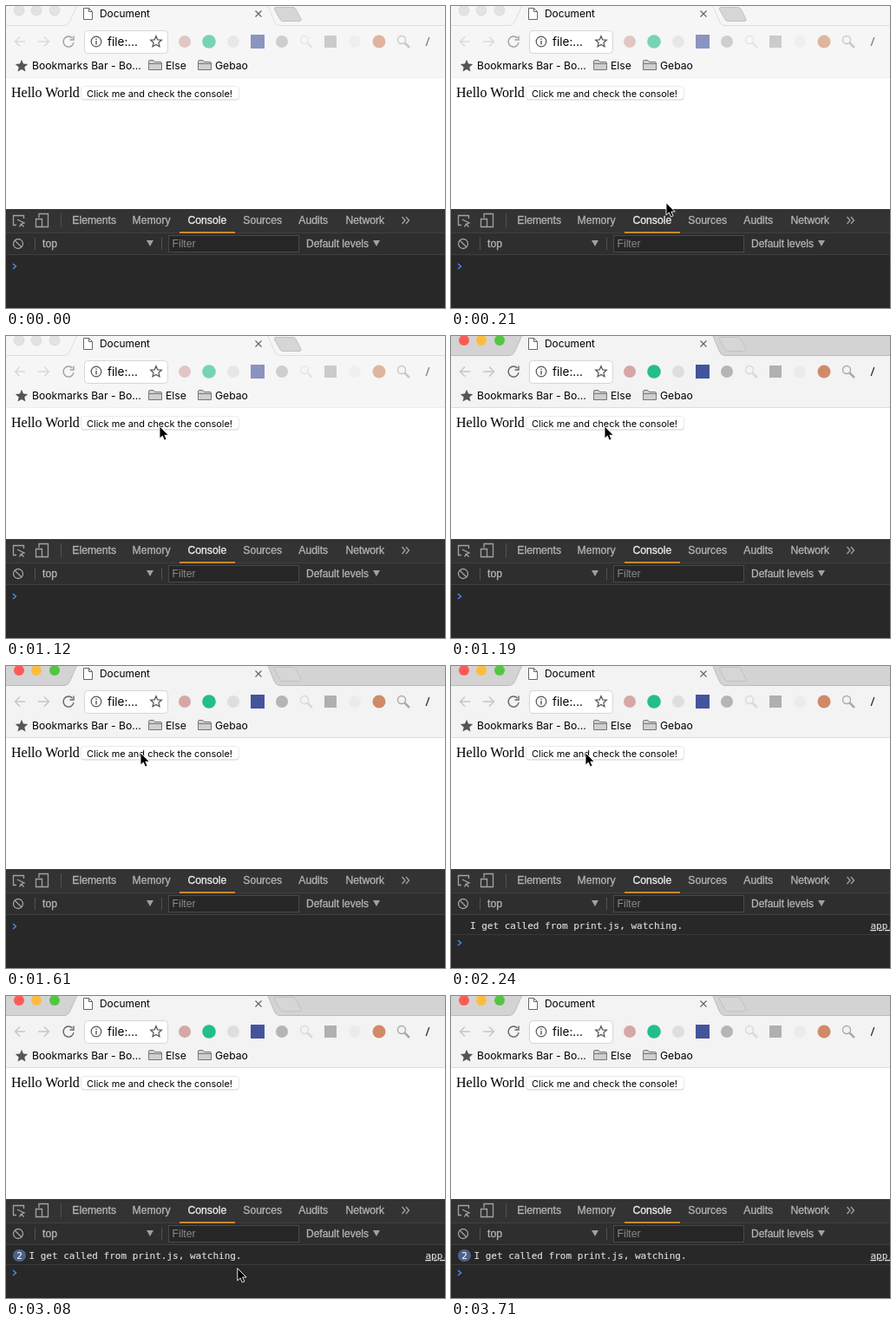
These frames come from a looping animation (506 by 348 pixels, 3.78 s). An HTML page:

```html
<!DOCTYPE html>
<html lang="en">
<head>
<meta charset="utf-8">
<title>Console demo</title>
<style>
html, body { margin: 0; width: 100%; height: 100%; overflow: hidden; background: #fff; }
svg { display: block; width: 506px; height: 348px; --frame: #f6f6f6; --bar: #f6f6f6; --edge: #dedede; --dim: .6; }
svg.active { --frame: #d3d3d3; --bar: #f3f3f3; --edge: #bdbdbd; --dim: 1; }
text { white-space: pre; }
.ui { font: 12.2px Inter, Roboto, sans-serif; fill: #000; }
.dev { font: 12.2px "Liberation Sans", Arial, sans-serif; fill: #b2b5b8; stroke: #b2b5b8; stroke-width: .3; }
.mono { font: 11px "DejaVu Sans Mono", monospace; fill: #dcdcdc; stroke: #dcdcdc; stroke-width: .15; }
.line { fill: none; stroke-width: 1.4; }
.frame { fill: var(--frame); }
.bar { fill: var(--bar); }
.edge { fill: none; stroke: var(--edge); }
.dim { opacity: var(--dim); }
.light { fill: #e2e2e2; stroke: #d4d4d4; stroke-width: .6; }
.active .light { fill: var(--c); stroke: none; }
</style>
</head>
<body>
<svg id="stage" viewBox="0 0 506 348">
  <defs>
    <path id="star" d="M0-7.2 2-2.4 7.2-2 3.3 1.5 4.5 6.6 0 3.9-4.5 6.6-3.3 1.5-7.2-2-2-2.4Z"/>
    <path id="folder" d="M.5 11.5V2Q.5.5 2 .5H6L7.5 2.5H14Q15.5 2.5 15.5 4V11.5ZM.5 4.5H15.5" fill="#d0d0d0" stroke="#777"/>
    <g id="lens" class="line" stroke="#aaa"><circle cx="-2" cy="-2" r="4.5"/><path d="M1.5 1.5 7 7" stroke-width="2.5"/></g>
  </defs>

  <!-- Browser window -->
  <rect class="frame" width="506" height="24"/>
  <g id="lights"></g>
  <path class="bar" d="M0 22.5H68Q72 22 74 17L81.5 0H302L309 17Q311 22 315 22.5H506V83H0Z"/>
  <path class="edge" d="M0 22.5H68Q72 22 74 17L81.5 0M302 0 309 17Q311 22 315 22.5H506"/>
  <path d="M311 1.5H331Q333 1.5 334 3.5L340 15Q341 17.5 338 17.5H319Q317 17.5 316 15.5L309.5 4Q308.5 1.5 311 1.5Z" fill="#d6d6d6" stroke="#c2c2c2"/>
  <path d="M89.5 2.5H95.5L99.5 6.5V15.5H89.5ZM95.5 2.5V6.5H99.5" fill="#fff" stroke="#666"/>
  <text class="ui" x="108" y="13" style="font-size:11.9px">Document</text>
  <path d="M287.5 5.5 294.5 12.5M294.5 5.5 287.5 12.5" stroke="#666" stroke-width="1.2"/>

  <g class="line dim" stroke="#c6c6c6">
    <path d="M22 41H11M16 35.5 10.5 41 16 46.5M37 41H49M44 35.5 49.5 41 44 46.5"/>
    <path d="M76.5 37A6 6 0 1 0 78 42M78 34.5V39H73.5" stroke="#666"/>
  </g>
  <rect x="90.5" y="28.5" width="96" height="26" rx="4" fill="#fff" stroke="#d6d6d6"/>
  <g class="line" stroke="#555">
    <circle cx="104" cy="41" r="5.8" style="stroke-width:1.2"/>
    <path d="M104 40V44.5M104 37.5V39"/>
    <use href="#star" transform="translate(173 41) scale(.88)"/>
  </g>
  <text class="ui" x="117" y="46" style="font-size:13.5px">file:…</text>
  <g class="dim">
    <circle cx="206" cy="41" r="7" fill="#d6a7a7"/>
    <circle cx="234" cy="41" r="7.8" fill="#24bd8d"/>
    <circle cx="262" cy="41" r="7" fill="#dedede"/>
    <rect x="282" y="33" width="16" height="16" fill="#44549c"/>
    <circle cx="318" cy="41" r="7" fill="#b5b5b5"/>
    <use href="#lens" x="346" y="41" opacity=".35"/>
    <rect x="367" y="34" width="14" height="14" fill="#b0b0b0"/>
    <circle cx="402" cy="41" r="7" fill="#ebebeb"/>
    <circle cx="430" cy="41" r="7.5" fill="#d18a68"/>
    <use href="#lens" x="458" y="41"/>
    <path d="M484.2 46 487.8 36" stroke="#333" stroke-width="1.3"/>
  </g>

  <use href="#star" x="18" y="69" fill="#555"/>
  <text class="ui" x="30" y="73">Bookmarks Bar - Bo…</text>
  <use href="#folder" x="164" y="62"/>
  <text class="ui" x="184" y="73">Else</text>
  <use href="#folder" x="221" y="62"/>
  <text class="ui" x="241" y="73">Gebao</text>

  <!-- Page -->
  <rect y="82" width="506" height="152" fill="#fff"/>
  <path class="edge" d="M0 82.5H506" opacity=".5"/>
  <text x="6" y="105" font-family="'Liberation Serif', Times, serif" font-size="16">Hello World</text>
  <rect x="86.5" y="93" width="182" height="15.5" rx="3.5" fill="#d0d0d0"/>
  <rect x="86.5" y="92.5" width="182" height="15" rx="3.5" fill="#fff" stroke="#e6e6e6" stroke-width=".8"/>
  <text class="ui" x="93" y="105" style="font-size:10.96px">Click me and check the console!</text>

  <!-- Developer tools -->
  <rect y="234" width="506" height="114" fill="#282828"/>
  <rect y="234" width="506" height="28" fill="#333"/>
  <rect y="262" width="506" height="24" fill="#2e2e2e"/>
  <path d="M0 261.5H506M0 286.5H506" stroke="#404040"/>
  <path d="M63.5 239V255M33.5 267V281M179.5 267V281" stroke="#525252"/>
  <rect x="200" y="260" width="64" height="2" fill="#c98a2b"/>
  <g class="line" stroke="#a2a2a2" style="stroke-width:1.3">
    <path d="M12 252.5H8.5V241.5H20.5V245"/>
    <path d="M13 246 21 250 17.5 251.2 20.5 254.5M17.5 251.2 15.5 254.5Z"/>
    <path d="M38 244V239.5H48.5V254.5H42M34.5 245.5H41.5V254.5H34.5Z"/>
    <path d="M456.5 243 460 247 456.5 251M461 243 464.5 247 461 251"/>
    <circle cx="14" cy="274" r="5.5"/><path d="M10 270 18 278"/>
  </g>
  <g id="tabs"></g>
  <text class="dev" x="42" y="278">top</text>
  <path d="M162 270H170L166 277ZM423 270H431L427 277Z" fill="#a0a0a0"/>
  <rect x="187.5" y="264.5" width="150" height="19" fill="#262626" stroke="#484848"/>
  <text class="dev" x="191.5" y="278" style="fill:#8a8a8a;stroke:none">Filter</text>
  <text class="dev" x="346" y="278" style="font-size:12px">Default levels</text>

  <g id="log">
    <path d="M0 309.5H506" stroke="#3a3a3a"/>
    <text id="message" class="mono" y="303">I get called from print.js, watching.</text>
    <text class="mono" x="483.5" y="303" text-decoration="underline">app.</text>
    <g id="badge">
      <rect x="8" y="292" width="15" height="14" rx="7" fill="#4b628c"/>
      <text class="mono" x="12.2" y="303" style="fill:#fff">2</text>
    </g>
  </g>
  <path id="prompt" class="line" d="M8-3 11.5 0 8 3" stroke="#4a8df0"/>

  <!-- Pointers, with the hot spot at the origin -->
  <path id="arrow" d="M0 0V14.2L3.3 11.2 5.5 16.2 8.1 15.1 5.9 10.3H10.3Z" fill="#000" stroke="#fff" stroke-width=".9"/>
  <path id="hand" d="M-1.5 9V1.5Q0-1 1.5 1.5V6Q3.5 5 4.3 6.8 6.2 6 6.8 7.8 8.5 7.5 8.5 9.5V12Q8 14 7 16H-.5Q-2 13-5 9.5-4.5 7-1.5 9Z" fill="#fff" stroke="#111" stroke-width=".9"/>
</svg>
<script>
const LOOP = 3780, STEP = 70;
const FOCUS = 1190, FIRST_LOG = 1750, SECOND_LOG = 2520;
// Pointer path: time, x, y
const path = [
  [70, 290, 340], [280, 227, 170], [490, 205, 115], [560, 195, 113],
  [910, 177, 104], [1330, 177, 104], [1540, 155, 100], [2590, 155, 100],
  [2800, 223, 249], [2870, 224, 250], [3150, 281, 335]
];
const $ = id => document.getElementById(id);
const show = (id, on) => $(id).style.display = on ? "" : "none";

$("lights").innerHTML = [[15, "#fc5b57"], [35, "#fdbc40"], [56, "#55c445"]]
  .map(([x, c]) => `<circle class="light" cx="${x}" cy="5" r="6" style="--c:${c}"/>`).join("");

$("tabs").innerHTML = [["Elements", 76.3], ["Memory", 145.5], ["Console", 209.5], ["Sources", 273.3], ["Audits", 337.3], ["Network", 391.5]]
  .map(([name, x]) => {
    const color = name === "Console" ? "#eee" : "#b2b5b8";
    return `<text class="dev" x="${x}" y="251" style="fill:${color};stroke:${color}">${name}</text>`;
  }).join("");

function pointerAt(t) {
  const i = path.findIndex(p => p[0] >= t);
  if (i < 0 || t < path[0][0]) return null;
  if (i === 0) return path[0].slice(1);
  const [t0, x0, y0] = path[i - 1], [t1, x1, y1] = path[i];
  const k = (t - t0) / (t1 - t0);
  return [x0 + (x1 - x0) * k, y0 + (y1 - y0) * k];
}

function draw(t) {
  const logged = t >= FIRST_LOG, twice = t >= SECOND_LOG;
  $("stage").classList.toggle("active", t >= FOCUS);
  show("log", logged);
  show("badge", twice);
  $("message").setAttribute("x", twice ? 26.5 : 22);
  $("prompt").setAttribute("transform", `translate(0 ${logged ? 319 : 300})`);

  const pos = pointerAt(t);
  const overTab = pos && pos[1] > 234 && pos[1] < 261;
  show("arrow", pos && !overTab);
  show("hand", overTab);
  if (pos) $(overTab ? "hand" : "arrow").setAttribute("transform", `translate(${pos})`);
}

const start = performance.now();
function tick() {
  const t = (performance.now() - start) % LOOP;
  draw(Math.floor(t / STEP) * STEP);
  requestAnimationFrame(tick);
}
tick();
</script>
</body>
</html>
```
